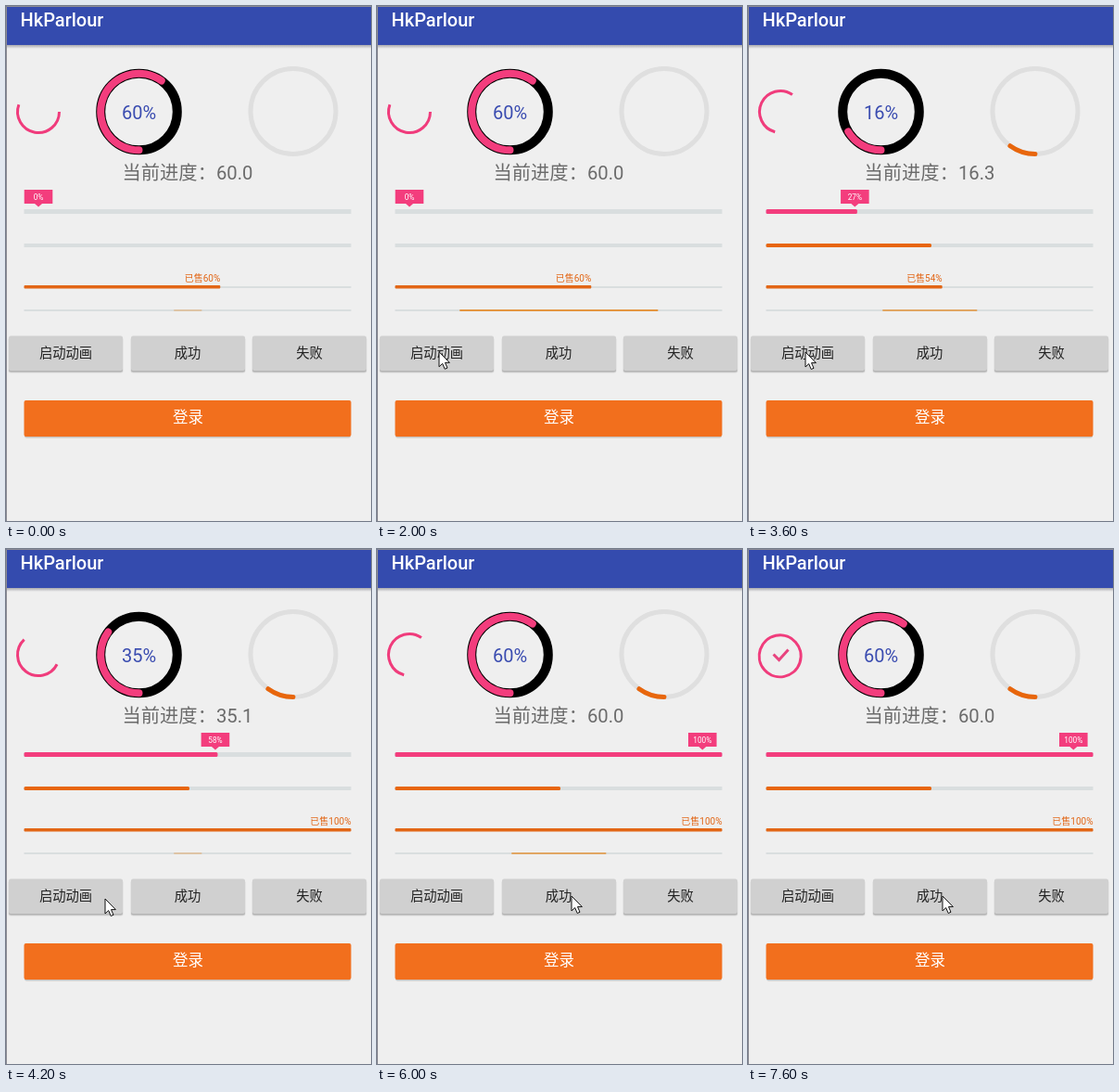
An HTML page that plays this animation: 394x555 px, repeating every 8000 ms.

```html
<!DOCTYPE html>
<html lang="zh">
<head>
<meta charset="utf-8">
<style>
  html, body { margin: 0; width: 100%; height: 100%; overflow: hidden; background: #efefef; }
  svg { display: block; }
  text { font-family: Roboto, "Noto Sans CJK SC", "Noto Sans CJK", sans-serif; }
  .mid { text-anchor: middle; }
  .round { stroke-linecap: round; }
  .none { fill: none; }
</style>
</head>
<body>
<svg width="394" height="555" viewBox="0 0 394 555">
  <defs>
    <linearGradient id="shade" x2="0" y2="1">
      <stop stop-color="#a9a9ad"/><stop offset="1" stop-color="#efefef"/>
    </linearGradient>
    <clipPath id="keys">
      <rect x="3" y="356" width="123" height="37" rx="2"/>
      <rect x="135" y="356" width="123" height="37" rx="2"/>
    </clipPath>
  </defs>
  <rect width="394" height="555" fill="#efefef"/>
  <rect y="42" width="394" height="4" fill="url(#shade)"/>
  <rect width="394" height="42" fill="#344bae"/>
  <path d="M.5 555V.5H394" class="none" stroke="#8c8c94"/>
  <text x="15.5" y="22" font-size="20" font-weight="500" fill="#fff">HkParlour</text>

  <g class="none round">
    <path id="spin" stroke="#f03c7c" stroke-width="3" stroke-linecap="butt"/>
    <path id="tick" stroke="#e8447f" stroke-width="3" stroke-linecap="butt" pathLength="1"
      d="M27.5 113.5L33.5 119.5L43.5 108.5"/>
    <circle cx="143.5" cy="114" r="41.3" stroke="#000" stroke-width="10"/>
    <path id="dial" stroke="#f33d7d" stroke-width="8"/>
    <circle cx="310" cy="113.5" r="46" stroke="#dfdfdf" stroke-width="5"/>
    <path id="ring" stroke="#e8660c" stroke-width="5"/>
  </g>
  <text id="pct" class="mid" x="143.5" y="122" font-size="20" fill="#3a4cb0"></text>
  <text id="now" x="125.5" y="187" font-size="20.3" fill="#6b6b6b"></text>

  <g fill="#d9dedf">
    <rect x="19.5" y="219" width="353" height="5"/>
    <rect x="19.5" y="256" width="353" height="4"/>
    <rect x="19.5" y="302" width="353" height="2"/>
    <rect x="19.5" y="327" width="353" height="2"/>
  </g>
  <rect id="pinkBar" x="19.5" y="219" height="5" rx="1.5" fill="#f33d7d"/>
  <rect id="halfBar" x="19.5" y="256" height="4" rx="1.5" fill="#e8660c"/>
  <rect id="soldBar" x="19.5" y="301" height="3.4" rx="1" fill="#e26616"/>
  <rect id="pulse" y="327" height="2" fill="#e5933a"/>
  <g id="tip">
    <path d="M-15.3 198h30.6v15h-11.3l-4 3.5l-4 -3.5h-11.3z" fill="#f33d7d"/>
    <text id="tipText" class="mid" y="208.5" font-size="8.3" fill="#fff"></text>
  </g>
  <text id="sold" y="296.5" font-size="10" fill="#e26616" text-anchor="end"></text>

  <g id="buttons"></g>
  <circle id="ripple" cy="373" fill="#bdbdbd" clip-path="url(#keys)"/>
  <g class="mid" font-size="14.3" font-weight="500" fill="#222">
    <text x="64.5" y="379.3">启动动画</text>
    <text x="196" y="379.3">成功</text>
    <text x="327.5" y="379.3">失败</text>
  </g>
  <rect x="20" y="426" width="352" height="39.5" rx="2" fill="#c9c4c0"/>
  <rect x="19.5" y="425" width="353" height="39" rx="2" fill="#f26f1d"/>
  <text class="mid" x="196.5" y="449" font-size="16.5" font-weight="500" fill="#fff">登录</text>

  <path id="mouse" d="M0 0V16L3.7 12.6L6.2 18.5L9 17.3L6.5 11.6H11.4Z" fill="#fff" stroke="#111"/>
</svg>
<script>
const LOOP = 8000, STEP = 200, LEFT = 19.5, FULL = 353;
const START = 3080, CLICK = 2600, DONE = 6200;
const $ = id => document.getElementById(id);
const set = (id, attrs) => { for (const k in attrs) $(id).setAttribute(k, attrs[k]); };
const clamp = (v, lo = 0, hi = 1) => Math.min(hi, Math.max(lo, v));

$("buttons").innerHTML = [3, 135, 266].map(x =>
  `<rect x="${x - .5}" y="357" width="124" height="38.5" rx="2.5" fill="#dadada"/>
   <rect x="${x}" y="357" width="123" height="37.5" rx="2" fill="#b4b4b4"/>
   <rect x="${x}" y="355.5" width="123" height="37.5" rx="2" fill="#d0d0d0"/>`).join("");

function arc(cx, cy, r, from, sweep) {
  const at = deg => {
    const a = deg * Math.PI / 180;
    return `${(cx + r * Math.cos(a)).toFixed(2)} ${(cy + r * Math.sin(a)).toFixed(2)}`;
  };
  const to = from + clamp(sweep, 0.01, 359.9);
  return `M${at(from)}A${r} ${r} 0 ${to - from > 180 ? 1 : 0} 1 ${at(to)}`;
}

// Linear interpolation through [time, ...values] rows
function track(rows, t) {
  let i = 0;
  while (i < rows.length - 2 && t > rows[i + 1][0]) i++;
  const [a, b] = [rows[i], rows[i + 1]];
  const p = clamp((t - a[0]) / (b[0] - a[0]));
  return a.slice(1).map((v, k) => v + (b[k + 1] - v) * p);
}

const TURN = [[0, 0], [2400, 0], [2600, 7], [3600, 465], [4200, 747], [6000, 1545], [7000, 1995]];
const MOUSE = [[200, 60, 17], [800, 50, 428], [1200, 80, 378], [1800, 68, 373], [2600, 64, 372],
  [3600, 62, 373], [4200, 107, 377], [4400, 140, 423], [4800, 200, 25], [5400, 215, 390], [6000, 210, 374]];
// Half width and opacity of the expanding line
const PULSE = [[15, .35], [51, .75], [107, .95], [157.5, .45]];

function drawPulse(t) {
  const n = t / STEP;
  const [w, o] = PULSE[(t < CLICK ? n : n + 3) % 4];
  const hidden = t === CLICK || t >= 7600;
  set("pulse", { x: 196.3 - w, width: 2 * w, opacity: hidden ? 0 : o });
}

function drawRipple(t) {
  const first = t < DONE, age = t - (first ? CLICK : DONE);
  set("ripple", {
    cx: first ? 63 : 210,
    r: 41 + Math.max(0, age) * .17,
    opacity: age < 0 ? 0 : clamp(1 - age / 600) * .65
  });
}

function draw(t) {
  const run = clamp((t - START) / 1915);
  const value = t < 3000 ? 60 : 60 * run;
  const sold = t < 3000 ? .6 : clamp((t - START) / 965);
  const started = t >= CLICK;

  const sweep = 200 + 160 * clamp((t - 6300) / 700);
  set("spin", { d: arc(35, 114, 22.5, track(TURN, t)[0], sweep) });
  const tick = clamp((t - 7200) / 400);
  set("tick", { "stroke-dasharray": `${tick} 2`, opacity: tick > 0 ? 1 : 0 });

  set("dial", { d: arc(143.5, 114, 41.3, 90, value * 3.6) });
  $("pct").textContent = Math.floor(value) + "%";
  $("now").textContent = "当前进度：" + value.toFixed(1);
  set("ring", { d: arc(310, 113.5, 46, 90, 36), opacity: started ? 1 : 0 });

  const end = LEFT + FULL * run;
  set("pinkBar", { width: run > 0 ? Math.min(FULL, FULL * run + 2.5) : 0 });
  set("tip", { transform: `translate(${clamp(end, 35, 351.3)})` });
  $("tipText").textContent = Math.floor(run * 100) + "%";
  set("halfBar", { width: started ? 178.5 : 0 });
  set("soldBar", { width: FULL * sold });
  set("sold", { x: Math.max(54, LEFT + FULL * sold) });
  $("sold").textContent = `已售${Math.round(sold * 100)}%`;

  drawPulse(t);
  drawRipple(t);
  const [x, y] = track(MOUSE, t);
  set("mouse", { transform: `translate(${x} ${y})`, opacity: t < STEP ? 0 : 1 });
}

const origin = performance.now();
function tick() {
  const t = Math.max(0, performance.now() - origin) % LOOP;
  draw(Math.floor(t / STEP) * STEP);
  requestAnimationFrame(tick);
}
tick();
</script>
</body>
</html>
```
